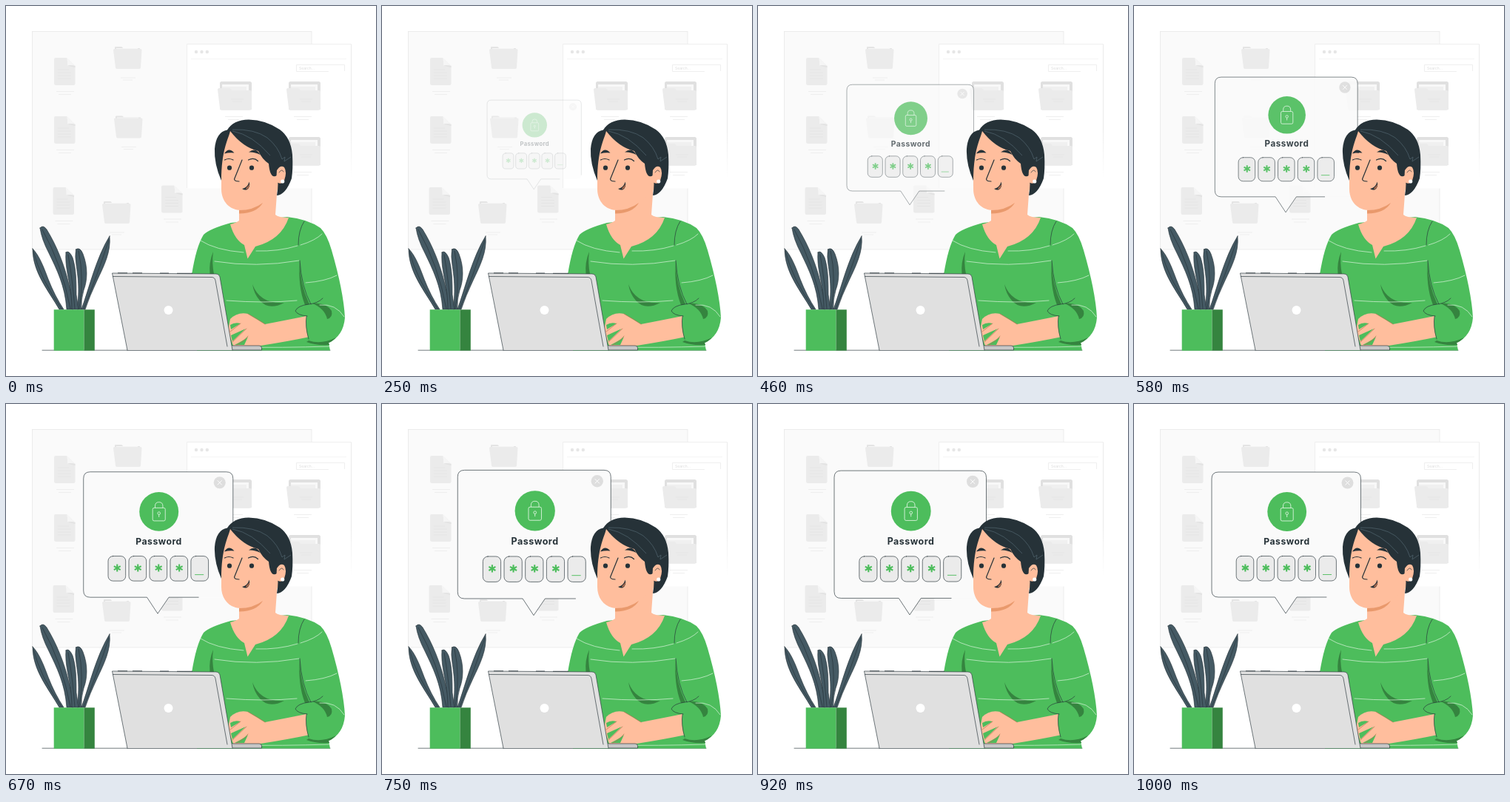
These frames come from a looping animation (500 px wide and 500 px high, 1040 ms). An HTML page:

```html
<!DOCTYPE html>
<html lang="en">
<head>
<meta charset="utf-8">
<title>Password prompt</title>
<style>
  html, body { margin: 0; width: 100%; height: 100%; overflow: hidden; background: #fff; }
  svg { display: block; width: 100vw; height: 100vh; }
  text { font-family: Inter, "Open Sans", sans-serif; }
  .ink { fill: none; stroke: #263238; stroke-width: .65; stroke-linecap: round; stroke-linejoin: round; }
  .lid { stroke-width: 1.2; }
  .crease { stroke: #b86e4e; }
  .seam { fill: none; stroke: #d3f0d6; stroke-width: .75; stroke-linecap: round; }
  .soft { fill: none; stroke: #ebebeb; stroke-width: .8; }
  .mark { fill: none; stroke: #e1e1e1; stroke-width: .6; }
  .green { fill: #4dbd5c; }
  .shade { fill: #35843f; }
  .skin { fill: #ffbe9d; }
  .dark { fill: #263238; }
  .leaf { fill: #455a64; }
  .cell { fill: #ebebeb; }
</style>
</head>
<body>
<svg viewBox="0 0 500 500">
  <defs>
    <linearGradient id="fade" x1="0" y1="0" x2="0" y2="1">
      <stop offset=".6" stop-color="#ebebeb"/><stop offset=".95" stop-color="#ebebeb" stop-opacity="0"/>
    </linearGradient>
    <g id="doc">
      <path fill="#ebebeb" d="M2 0H17L28.500 11V34.500Q28.500 37 26 37H2.500Q0 37 0 34.500V2Q0 0 2 0Z"/>
      <path fill="#f5f5f5" d="M17 0L28.500 11Q22 9.500 18 10.500Q18.500 5 17 0Z"/>
      <path fill="#e3e3e3" d="M18 10.500Q24 9.500 28.500 11V13Z"/>
      <path class="mark" d="M5 16H20M5 20H23M5 24H23M5 28H23"/>
      <path class="soft" d="M3 45.500H27M6 49.500H23"/>
    </g>
    <g id="folder">
      <path fill="#e4e4e4" d="M2 4V1Q2 0 3 0H11Q12 0 13 2H36V6H2Z"/>
      <path fill="#f5f5f5" d="M4 2H33V5H4Z"/>
      <path fill="#ebebeb" d="M1.500 3H37Q38.500 3 38.500 4.500L37 28Q37 30 35 30H5Q3 30 3 28L0 4.500Q0 3 1.500 3Z"/>
      <path class="soft" d="M10 42H30M13 45H26"/>
    </g>
    <g id="fullFolder">
      <rect x="3" width="43" height="38.500" rx="2.500" fill="#e0e0e0"/>
      <path fill="#f8f8f8" d="M6 4H42V14H6Z"/>
      <path fill="#f0f0f0" d="M6 7H39V14H6Z"/>
      <path fill="#ebebeb" d="M2 9H16Q18 9 19 12H44Q46 12 46 14V36Q46 38.500 43 38.500H5Q3 38.500 3 36L0 11Q0 9 2 9Z"/>
      <path class="mark" d="M18 24H35M20 27H33"/>
      <path class="soft" d="M10 47.500H34M14 51.500H30"/>
    </g>
    <path id="star" fill="none" stroke="#4dbd5c" stroke-width="2.100" d="M0 -5V5M-4.400 -2.500L4.400 2.500M-4.400 2.500L4.400 -2.500"/>
  </defs>

  <rect x="35.500" y="34.500" width="377.500" height="294.500" fill="#fafafa" stroke="#e8e8e8" stroke-width=".8"/>
  <g id="icons"></g>
  <rect x="244.500" y="51.500" width="222" height="195" fill="#fff"/>
  <path class="soft" d="M244.500 246V51.500H466.500"/>
  <rect x="466" y="51.500" width="1" height="190" fill="url(#fade)"/>
  <path class="soft" style="stroke:#f3f3f3" d="M250 71.500H460"/>
  <path class="soft" d="M392.500 88.500V79.500H457.500V88M392.500 88.500H436"/>
  <g fill="#e6e6e6"><circle cx="257" cy="62" r="2.200"/><circle cx="264.500" cy="62" r="2.200"/><circle cx="271.800" cy="62" r="2.200"/></g>
  <text x="396" y="85.800" font-size="5" fill="#dcdcdc">Search...</text>
  <g id="fullFolders"></g>

  <g id="popup">
    <path fill="#fafafa" d="M114 92H297.500Q306.500 92 306.500 101V252Q306.500 261 297.500 261H220L205 283L190.500 261H114Q105 261 105 252V101Q105 92 114 92Z"/>
    <path class="ink" d="M306.500 252V101Q306.500 92 297.500 92H114Q105 92 105 101V252Q105 261 114 261H190.500L205 283L220 261H260"/>
    <circle cx="288.500" cy="106.500" r="8" fill="#dedede"/>
    <path d="M285.500 103.500L291.500 109.500M291.500 103.500L285.500 109.500" stroke="#fff" stroke-width=".9"/>
    <circle class="green" cx="206.700" cy="145.500" r="26.400"/>
    <g fill="none" stroke="#d9f3dc" stroke-width=".9">
      <rect x="198.200" y="140.500" width="17" height="17.500" rx="2"/>
      <path d="M201.500 140.500V138Q201.500 132.800 206.700 132.800T211.900 138V140.500M206.700 149.500V153"/>
      <circle cx="206.700" cy="147.700" r="1.800"/>
    </g>
    <text x="206.500" y="190.300" font-size="12.200" font-weight="700" letter-spacing=".04em" text-anchor="middle" fill="#263238">Password</text>
    <g id="cells"></g>
    <path d="M255 230.500H267" stroke="#4dbd5c" stroke-width=".9"/>
  </g>

  <path class="ink" d="M49 465.200H438"/>

  <g id="person">
    <path class="green" d="M304 293Q275 301 267 309Q257 325 251 363L258 465.500H438L436 455Q456 446 458 421Q456 385 440 330Q434 309 425 300Q408 288 380 285Z"/>
    <path class="shade" d="M280 332Q274 346 275.500 362H281Q278 347 280 332Z"/>
    <path class="shade" d="M397 344Q397 376 410 403L404 404Q394 378 397 344Z"/>
    <path class="shade" d="M333 376Q343 403 376 401Q355 412 343 398Q335 389 333 376Z"/>
    <path class="shade" d="M414 402Q432 400 440 412Q442 421 434 423Q431 409 414 402Z"/>
    <path class="shade" d="M409 452Q426 458 446 448Q439 455 436 455L437 458Q418 459 406 454Z"/>
    <path class="seam" d="M263 317Q283 330 321 333M338 331Q368 332 394 324M398 323Q418 317 427 308M282 345Q338 354 396 344M405 374Q432 372 447 364M298 398Q350 402 393 398M424 404Q446 402 457 420M318 461Q370 462 437 460"/>
    <path class="ink" d="M403 291Q395 303 395 323M397 344Q399 379 412 403M428 395Q421 402 409 403Q394 405 391 412Q394 418 407 419"/>
    <path class="skin" d="M315 268V290Q311 293 303 295Q309 316 322 323L326.500 341.500L337 325Q372 316 382 286Q368 286 364 282L367 240Z"/>
    <path class="skin" d="M303 168Q291 190 291 215V247C291 264 302 276 318 276Q335 276 347 266Q360 258 368 247L371 190L345 165Z"/>
    <path fill="#e9996c" d="M315 276Q334 276 347 266Q339 280 315 280.500Z"/>
    <path class="dark" d="M291 236Q281 213 282 193Q284 170 299 167.500C304 159 314 153.500 328 153.500Q351 154 370 167Q385 178 387 201Q388 220 386 233Q378 255 366 256Q369 240 366 229Q357 235 355 213Q346 207 341 196Q320 191 303 169C300 181 291 195 291 236Z"/>
    <path fill="none" stroke="#526670" stroke-width=".7" d="M306 167Q336 166 353 178Q368 190 373 207L377 204L376 210L385 204M306 169Q333 174 357 202"/>
    <path class="skin" d="M366 222Q371 214 376 218Q380 224 376 236Q371 243 365 237Z"/>
    <path class="ink" d="M369 225Q373 219 375 224"/>
    <circle cx="373.700" cy="237" r="2.600" fill="#fff"/>
    <path class="dark" d="M295 199.500Q301 190 308.500 198.500Q302 197.500 295 199.500ZM328 197.500Q338 190 343.500 201Q336 197 328 197.500Z"/>
    <path class="ink lid" d="M295.500 208Q301 205 307 208M327.500 208Q335 204 340.500 209.500M319 208L308.500 234Q309 237 315 237"/>
    <circle class="dark" cx="302" cy="218.700" r="3.100"/><circle class="dark" cx="332" cy="218.700" r="3.100"/>
    <path class="dark" d="M319 247Q327 245 328.500 237.500Q331 245 325 248.500Q322 249 319 247Z"/>
    <path fill="#b86e4e" d="M324 246.500Q327 244 328.500 241Q329.500 245 325 247.800Z"/>
    <path class="skin" d="M406 419Q376 425 350 430Q335 421 327 416Q313 413 303 423L300 438L307 459H344Q382 453 408 447.500Q404 433 406 419Z"/>
    <path class="green" d="M303 431Q309 427 317 429L304 437ZM304 445L324 436L306 453ZM309 458Q321 452 327 447L322 458Z"/>
    <path class="ink crease" d="M317 429L303 440M325 436L306 454M327 446Q322 453 312 458M327 416Q340 423 350 430"/>
    <path class="ink" d="M406 419Q404 433 409 450"/>
  </g>

  <path d="M304 459H342Q345.500 459 345.500 462V465H304Z" fill="#c7c7c7"/>
  <path class="ink" d="M306 459H342Q345.500 459 345.500 462V465H164"/>
  <path fill="#e0e0e0" d="M143.500 361L284 362Q288 362 289 366L306 465H164Z"/>
  <path class="ink" d="M164 465L143.500 361L284 362Q288 362 289 366L306 465M144.500 365.500L278 366.500Q282 366.500 283 371L299 460"/>
  <path d="M151 360.800H164M171 360.800H184M208 361H220M231 361.300H252" stroke="#263238" stroke-width=".8"/>
  <circle cx="219.500" cy="411" r="6" fill="#fff"/>

  <g id="plant"></g>
  <path class="green" d="M64.700 410.300H105.500V465.700H64.700Z"/>
  <path class="shade" d="M105.500 410.300H119.800V465.700H105.500Z"/>
</svg>
<script>
const $ = id => document.getElementById(id);
const uses = (ref, spots) => spots.map(([x, y]) => `<use href="#${ref}" x="${x}" y="${y}"/>`).join("");

$("icons").innerHTML =
  uses("doc", [[65, 70], [65, 149], [63.5, 245], [210, 242.5]]) +
  uses("folder", [[145, 55], [146, 148.5], [130, 264]]);
$("fullFolders").innerHTML = uses("fullFolder", [[286, 102], [379, 102], [379, 177]]);

$("cells").innerHTML = [0, 1, 2, 3, 4].map(i => {
  const x = 138.2 + i * 27.9;
  return `<rect class="ink cell" x="${x}" y="205.5" width="23.6" height="33.5" rx="6.5"/>` +
    (i < 4 ? uses("star", [[x + 12.2, 221.5]]) : "");
}).join("");

// Each leaf: outline, then its central vein.
const leaves = [
  ["M36 328C45 337 51 353 57 369Q66 392 78 410H72C57 384 36 360 36 328Z", "M37 331Q46 368 75 409"],
  ["M140 311C142 332 133 350 123 371Q113 392 107 410H102C113 379 122 340 140 311Z", "M139 316Q123 365 105 409"],
  ["M46 300Q50 295 55 302C68 323 79 350 85 376Q90 393 91 410H82C80 378 68 355 58 334Q48 315 46 300Z", "M49 302Q76 350 87 409"],
  ["M94.500 329Q100 325 104 335C111 353 110 371 105 384Q101 397 102 410H96C100 382 97 365 95 350Q93 338 94.500 329Z", "M98 331Q106 367 99 409"],
  ["M81 333Q85 329 90 340C95 355 95 375 95 390L98 410H89C89 388 85 373 83 361Q80 345 81 333Z", "M84 336Q90 370 93 409"]
];
$("plant").innerHTML = leaves.map(([shape, vein]) =>
  `<path class="ink leaf" d="${shape}"/><path class="ink" d="${vein}"/>`).join("");

const LOOP = 1040, FPS = 24, LEAD = 0.02, FIRST_VISIBLE = 4;
const CENTER = [205.6, 187.4];

const bezier = (u, a, b) => 3 * u * (1 - u) ** 2 * a + 3 * u * u * (1 - u) * b + u ** 3;

// cubic-bezier(.36, -.01, .5, 1.38): overshoots, then settles
function ease(x) {
  if (x >= 1) return 1;
  let lo = 0, hi = 1;
  for (let i = 0; i < 24; i++) {
    const mid = (lo + hi) / 2;
    if (bezier(mid, 0.36, 0.5) < x) lo = mid; else hi = mid;
  }
  return bezier(lo, -0.01, 1.38);
}

const popup = $("popup");

function render(ms) {
  const step = Math.floor((ms % LOOP + 5) * FPS / 1000);
  const e = ease(step / FPS + LEAD);
  const [x, y] = CENTER;
  popup.setAttribute("opacity", step < FIRST_VISIBLE ? 0 : Math.min(1, e));
  popup.setAttribute("transform", `translate(${x} ${y}) scale(${0.5 + 0.5 * e}) translate(${-x} ${-y})`);
}

const start = performance.now();
function tick() {
  render(performance.now() - start);
  requestAnimationFrame(tick);
}
tick();
</script>
</body>
</html>
```
